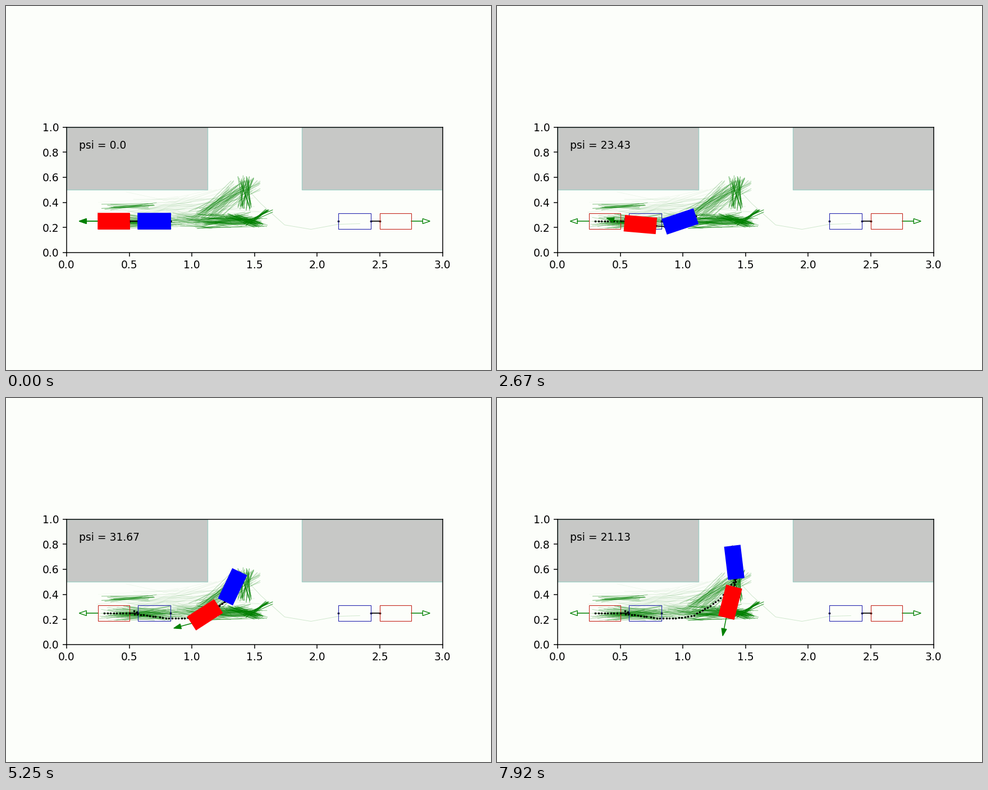
A matplotlib script for the animation above (8 s loop, 864 px wide and 648 px high).

```python
import matplotlib.pyplot as plt
import numpy as np
from matplotlib.animation import FuncAnimation
from matplotlib.collections import LineCollection
from matplotlib.patches import Polygon, Rectangle

FRAMES, FPS = 96, 12
DOT_GAP = 0.025
SPEED = DOT_GAP * 56 / 41          # travel per frame
TRUCK, LINK, TRAILER, HALF = 0.25, 0.07, 0.26, 0.0625
WHEELBASE = 0.2
ARROW, HEAD, HEAD_HALF = 0.15, 0.058, 0.02
BG = "#fcfefa"

# The drive is a chain of circular arcs:
# frames (negative = forward gear), truck angle and psi at the end.
LEGS = [
    (-6, 0, 0), (6, -2.95, 5.89), (6.2, -10, 44), (-4.8, -19.8, 24.75),
    (-1, -21.9, 21), (7.4, -6, 22), (9.6, 12.2, 44.91), (-4.8, 2, 30),
    (7.2, 29, 32.46), (5.2, 40, 44.5), (-4.2, 31, 31), (10.7, 64.4, 43),
    (-0.9, 61.5, 42.21), (-1.4, 59, 39), (4.5, 67, 44.5), (-5.2, 62, 27),
    (4.9, 73, 41), (-5, 75.7, 21.13),
]


def unit(deg):
    a = np.radians(deg)
    return np.array([np.cos(a), np.sin(a)])


def arc(start, phi, turn, length):
    """End of an arc that leaves start at angle phi and turns by turn degrees."""
    return start + length * np.sinc(turn / 360) * unit(phi + turn / 2)


def plan():
    """Start time, duration, start state, changes and steering of every leg."""
    legs, t, rear, phi, psi = [], 0, np.array([0.5, 0.25]), 0, 0
    for frames, phi_end, psi_end in LEGS:
        length, turn = frames * SPEED, phi_end - phi
        steer = -np.degrees(np.arctan(WHEELBASE * np.radians(turn) / length))
        legs.append((t, abs(frames), rear, phi, psi,
                     turn, psi_end - psi, length, steer))
        rear = arc(rear, phi, turn, length)
        t, phi, psi = t + abs(frames), phi_end, psi_end
    return legs


DRIVE = plan()


def pose(k):
    """Rear axle, truck angle, psi and steering at frame k."""
    leg = next((d for d in DRIVE if k <= d[0] + d[1] + 1e-6), DRIVE[-1])
    t, span, rear, phi, psi, turn, bend, length, steer = leg
    u = (k - t) / span
    return (arc(rear, phi, turn * u, length * u), phi + turn * u,
            psi + bend * u, steer)


def make_trail():
    """One dot per step, skipping places that already have one."""
    times, points = [], []
    for t in np.arange(0, FRAMES, DOT_GAP / SPEED):
        p = pose(t)[0]
        if all(np.hypot(*(p - q)) > 0.7 * DOT_GAP for q in points):
            times.append(t)
            points.append(p)
    return np.array(times), np.array(points)


def box(start, deg, length):
    d = unit(deg)
    n = HALF * np.array([-d[1], d[0]])
    end = start + length * d
    return [start + n, end + n, end - n, start - n]


class Rig:
    """Truck, trailer, hitch and steering arrow."""

    def __init__(self, ax, solid, z):
        red, blue = ("red", "blue") if solid else ("#c62a20", "#2a2ab0")
        lw = 0.8 if solid else 0.6
        self.link, = ax.plot([], [], "k-", lw=0.9, zorder=z)
        self.dots, = ax.plot([], [], "ko", ms=2, mew=0, zorder=z)
        self.shaft, = ax.plot([], [], color="green", lw=0.8, zorder=z)

        def shape(edge, filled, width):
            return ax.add_patch(Polygon([(0, 0)] * 3, ec=edge, lw=width,
                                        fc=edge if filled else "none",
                                        zorder=z + 0.5))

        self.head = shape("green", solid, 0.7)
        self.truck = shape(red, solid, lw)
        self.trailer = shape(blue, solid, lw)

    def place(self, rear, phi, psi=0, steer=0):
        beta = phi + psi
        rear = np.asarray(rear, float)
        hitch = rear + LINK * unit(phi)
        tail = hitch + TRAILER * unit(beta)
        front = rear - TRUCK * unit(phi)
        d = unit(phi + steer)
        n = HEAD_HALF * np.array([-d[1], d[0]])
        tip = front - ARROW * d
        neck = tip + HEAD * d
        self.link.set_data(*zip(rear, hitch))
        self.dots.set_data(*zip(rear, hitch, tail))
        self.shaft.set_data(*zip(front, neck))
        self.head.set_xy([tip, neck + n, neck - n])
        self.truck.set_xy(box(front, phi, TRUCK))
        self.trailer.set_xy(box(hitch, beta, TRAILER))


def draw_tree(ax):
    """Search tree: sheaves of random edges between a few places."""
    rng = np.random.default_rng(7)

    def sheaf(n, start, end, spread, alpha):
        noise = np.clip(rng.normal(size=(n, 2, 2)), -1.8, 1.8)
        lines = np.array([start, end]) + noise * (spread, 0.4 * spread)
        ax.add_collection(LineCollection(
            lines, colors="green", alpha=alpha, zorder=2,
            linewidths=rng.uniform(0.2, 0.7, n)), autolim=False)

    knot, crown = (1.46, 0.265), (1.42, 0.53)
    sheaf(50, (0.6, 0.34), (1.25, 0.38), 0.2, 0.08)
    sheaf(12, (0.35, 0.36), (0.65, 0.375), 0.04, 0.5)
    sheaf(80, (0.4, 0.25), (0.8, 0.25), 0.08, 0.3)
    sheaf(40, (0.9, 0.27), (1.2, 0.25), 0.08, 0.3)
    sheaf(60, (1.1, 0.25), knot, 0.08, 0.4)
    sheaf(24, (1.32, 0.29), (1.53, 0.22), 0.03, 0.7)
    sheaf(14, (1.44, 0.23), (1.61, 0.335), 0.02, 0.9)
    sheaf(60, (1.1, 0.3), crown, 0.07, 0.28)
    sheaf(26, (1.43, 0.59), (1.43, 0.36), 0.035, 0.6)

    branch = [crown, (1.55, 0.39), (1.74, 0.22), (1.95, 0.185),
              (2.17, 0.225), (2.34, 0.23)]
    ax.plot(*zip(*branch), color="green", alpha=0.18, lw=0.5, zorder=2)


plt.rcParams["font.family"] = "DejaVu Sans"
fig, ax = plt.subplots(figsize=(6.4, 4.8), dpi=135, facecolor=BG)
fig.subplots_adjust(left=0.125, right=0.9, bottom=0.11, top=0.88)
ax.set_facecolor(BG)
ax.set_aspect("equal")

for left in (0, 1.875):
    ax.add_patch(Rectangle((left, 0.5), 1.125, 0.5, fc="#c7c8c6",
                           ec="#9fcfc6", lw=0.7, zorder=1))
draw_tree(ax)
Rig(ax, False, 3).place((0.5, 0.25), 0)
Rig(ax, False, 3).place((2.5, 0.25), 180)

trail_times, trail_points = make_trail()
trail, = ax.plot([], [], "ko", ms=1.9, mew=0, zorder=4)
rig = Rig(ax, True, 5)
label = ax.text(0.1, 0.83, "", fontsize=10, zorder=6)

ax.set_xlim(0, 3)
ax.set_ylim(0, 1)
ax.set_xticks(np.arange(0, 3.1, 0.5))
ax.set_yticks(np.arange(0, 1.1, 0.2))


def update(k):
    rear, phi, psi, steer = pose(k)
    rig.place(rear, phi, psi, steer)
    trail.set_data(*trail_points[trail_times <= k].T)
    label.set_text(f"psi = {abs(round(float(psi), 2))}")
    return trail, label


anim = FuncAnimation(fig, update, frames=FRAMES, interval=1000 / FPS,
                     repeat=True, repeat_delay=0, blit=False)
plt.show()
```
